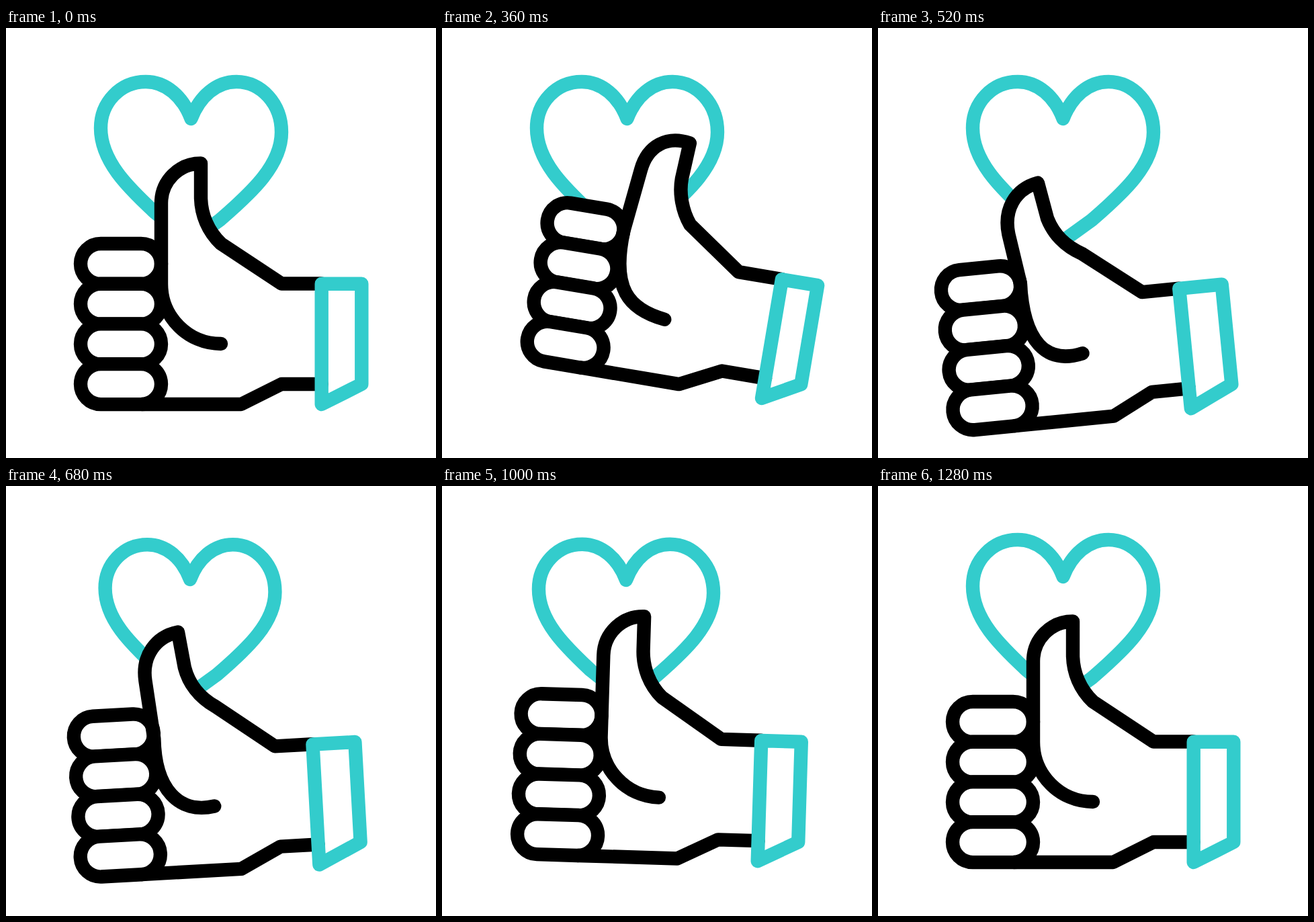
Animation of 640x640 px, one loop 1.48 s. Source, as an HTML page:

```html
<!DOCTYPE html>
<html lang="en">
<head>
<meta charset="utf-8">
<title>Thumbs up</title>
<style>
  html, body { margin: 0; width: 100%; height: 100%; overflow: hidden; background: #fff; }
  svg { display: block; width: 100vw; height: 100vh; }
  .ink, .teal { fill: none; stroke-width: 20.4; stroke-linecap: round; stroke-linejoin: round; }
  .ink { stroke: #000; }
  .teal { stroke: #3cc; }
  .white { fill: #fff; }
</style>
</head>
<body>
<svg viewBox="0 0 640 640">
  <path id="heart" class="teal" d="M275.5 135C263 102 238 80 208 80C170 80 141 111 141 149
    C141 203 192 246 221 274L275 317L318 286C368 243 410 203 410 155C410 113 380 80 343 80C313 80 288 102 275.5 135Z"/>
  <g id="hand">
    <path id="palm" class="white"/>
    <g id="fingers"></g>
    <path id="wrist" class="ink"/>
    <path id="thumb" class="ink"/>
    <path id="cuff" class="teal"/>
  </g>
</svg>
<script>
const LOOP = 1480, STEP = 40;
const $ = id => document.getElementById(id);

function setAttrs(el, attrs) {
  for (const name in attrs) el.setAttribute(name, attrs[name]);
  return el;
}

// Smooth 0 to 1 between two times.
function ease(t, from, to) {
  const x = Math.min(1, Math.max(0, (t - from) / (to - from)));
  return x * x * (3 - 2 * x);
}

const fingers = Array.from({ length: 4 }, (_, i) => {
  const pill = document.createElementNS('http://www.w3.org/2000/svg', 'rect');
  setAttrs(pill, { class: 'ink', y: 321 + 59.7 * i, height: 60, rx: 30 });
  pill.style.fill = '#fff';
  return $('fingers').appendChild(pill);
});

// The thumb tilts around its knuckle by lean; tuck tightens the palm crease.
function thumbPath(lean, tuck, wristX) {
  const at = (x, y) => `${x.toFixed(2)} ${y.toFixed(2)} `;
  const crease = (x, y, dx, dy) => at(x + dx * tuck, y + dy * tuck);
  const tilt = (x, y, dx = 0, dy = 0) => at(
    x + .122 * lean * (345 - y) + dx * tuck,
    y + .18 * lean * (x - 290) + dy * tuck);

  return 'M' + crease(320, 470 + 3 * lean, -7, -4.5)
    + 'C' + crease(271, 470 - 6 * lean, -13.5, -1.5) + crease(231, 430, -4, 7) + crease(231, 381, 0, -32)
    + 'L' + tilt(231, 261, 0, 4)
    + 'C' + tilt(231, 228) + tilt(257, 201.5, -3, 2) + tilt(290, 201.5, -1, 2)
    + 'L' + tilt(290, 251, 2, 7)
    + 'C' + tilt(290, 278, 5, 2) + tilt(301, 303, 6, 0) + crease(320, 321 + 4 * lean, 7, -2)
    + 'L410 380.5H' + wristX;
}

function drawHand(t) {
  const raise = ease(t, 0, 280), drop = ease(t, 320, 560);
  const rise = ease(t, 560, 880), settle = ease(t, 880, 1080);
  const angle = 10.9 * raise - 17.85 * drop + 11.95 * rise - 5 * settle;
  const lean = 1.17 * (raise - 2 * drop + rise);
  const tuck = raise - rise;

  const cuffX = 469.7 + 4.9 * lean + .7 * tuck;
  const thumb = thumbPath(lean, tuck, cuffX);
  setAttrs($('hand'), { transform: `rotate(${angle} 529.5 560)` });
  setAttrs($('thumb'), { d: thumb });
  setAttrs($('palm'), { d: thumb + 'V530H410L350 560H215V470Z' });
  setAttrs($('wrist'), { d: `M202 560H350L410 530H${cuffX}` });
  setAttrs($('cuff'), { d: `M${cuffX} 380.7H529.3V530L${cuffX} 560Z` });

  const inset = 2 * lean + 3.5 * tuck;
  for (const pill of fingers) setAttrs(pill, { x: 111 + inset, width: 120 - inset });
}

function drawHeart(t) {
  const shrink = ease(t, 560, 680), swell = ease(t, 680, 840);
  const scale = 1 - .06 * shrink + .082 * swell
    - .055 * ease(t, 840, 1000) + .033 * ease(t, 1000, 1280);
  const x = 275.5 - 1.5 * (shrink - ease(t, 1000, 1280));
  const y = 200 + 4 * (swell - ease(t, 840, 1280));
  setAttrs($('heart'), { transform: `translate(${x} ${y}) scale(${scale}) translate(-275.5 -200)` });
  $('heart').style.strokeWidth = 20.4 / scale;
}

const start = performance.now();
function tick() {
  const t = (performance.now() - start) % LOOP;
  const held = Math.floor(t / STEP) * STEP;
  drawHand(held);
  drawHeart(held);
  requestAnimationFrame(tick);
}
tick();
</script>
</body>
</html>
```
